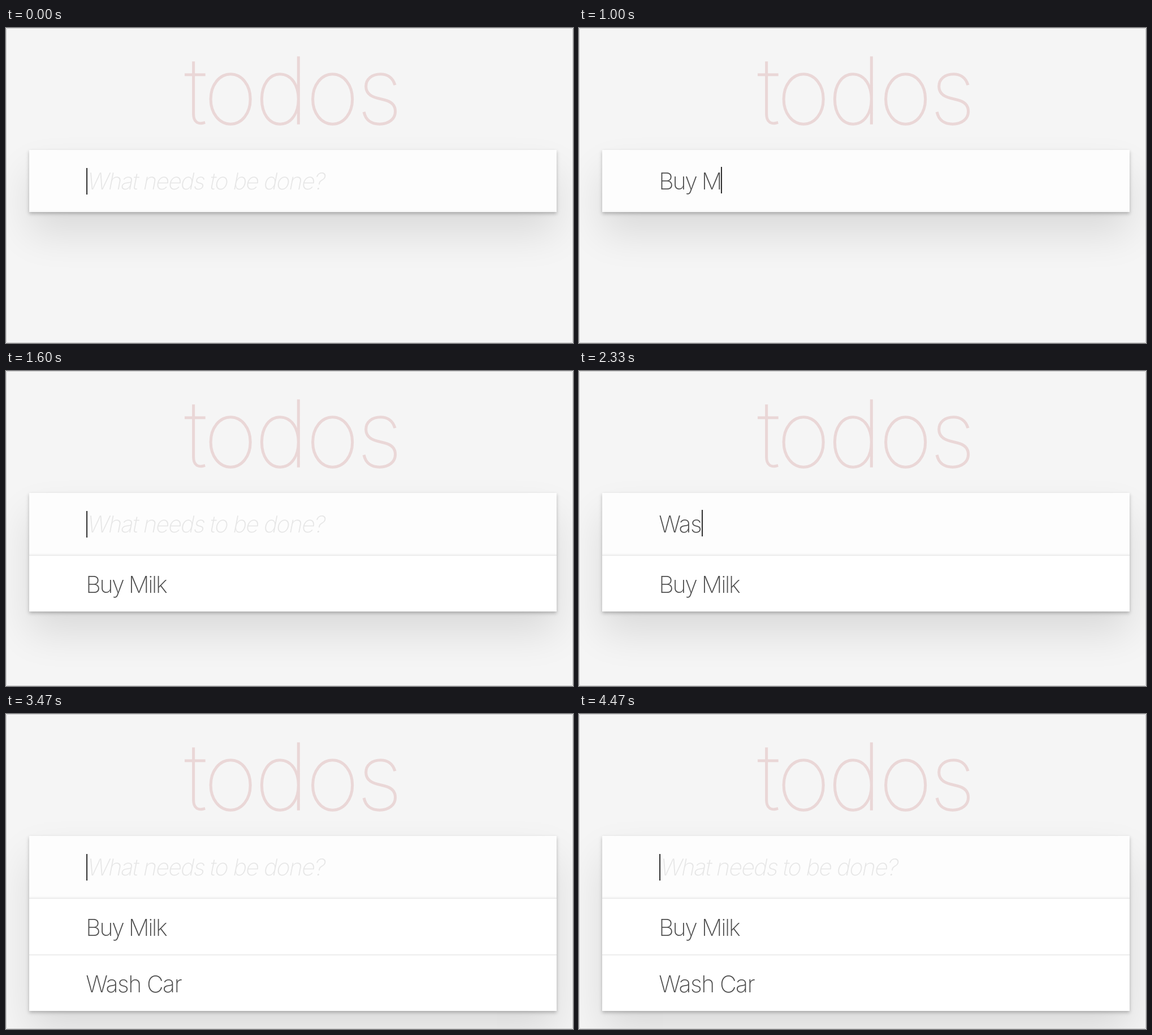
Animation of 1003 by 558 pixels, one loop 4.59 s. Source, as an HTML page:

```html
<!DOCTYPE html>
<html lang="en">
<head>
<meta charset="utf-8">
<title>todos</title>
<style>
  html, body { margin: 0; width: 100%; height: 100%; overflow: hidden; background: #f5f5f5; }
  #stage { position: absolute; left: 0; top: 0; width: 1003px; height: 558px; overflow: hidden; }
  #panel {
    position: absolute; left: 41px; top: 215.5px; width: 933px; background: #fff;
    box-shadow: 0 3.4px 6px rgba(0,0,0,.25), 0 38px 70px rgba(0,0,0,.11);
  }
  #field { height: 110px; background: #fdfdfd; box-shadow: inset 0 -3px 2px rgba(0,0,0,.02); }
  #frame { position: absolute; inset: 0; border: 1px solid #c9c9c9; border-radius: 3px; }
  svg { position: absolute; left: 0; top: 0; }
  text { font-family: Inter, "Helvetica Neue", Arial, sans-serif; white-space: pre; }
  .title {
    font-size: 163px; font-weight: 100; letter-spacing: -4.3px;
    fill: #ead7d7; stroke: #ead7d7; stroke-width: 1.4px;
  }
  .entry { font-size: 41px; font-weight: 200; fill: #4d4d4d; }
  .hint { font-size: 41px; font-weight: 200; fill: #e6e6e6; letter-spacing: -1.7px; }
  .rule { fill: #e4e4e4; }
</style>
</head>
<body>
<div id="stage">
  <div id="panel"><div id="field"></div></div>
  <svg width="1003" height="558" viewBox="0 0 1003 558">
    <text class="title" x="316" y="169.5">todos</text>
    <text class="hint" id="hint" transform="translate(142 286) skewX(-11)">What needs to be done?</text>
    <text class="entry" id="draft" x="141.3" y="286"></text>
    <g id="items"></g>
    <rect id="caret" width="1.8" height="47" fill="#181818"/>
  </svg>
  <div id="frame"></div>
</div>
<script>
const LOOP = 4590;
const FIELD_HEIGHT = 110, ROW_HEIGHT = 100.2;
const CARET_OFF = [4000, 4470];

// Each task: its text and tracking, the time of every keystroke, the time it is added,
// and the caret's place after each key.
const TASKS = [
  { text: "Buy Milk", tracking: -2.3, added: 1600,
    keys: [130, 400, 600, 800, 930, 1070, 1270, 1470],
    carets: [169, 191, 208, 218, 252, 260, 268, 284.4] },
  { text: "Wash Car", tracking: -1.5, added: 3470,
    keys: [2000, 2200, 2330, 2530, 2600, 2870, 3070, 3200],
    carets: [179, 199, 218, 238, 249, 279, 299, 311.4] }
];

const byId = id => document.getElementById(id);
const panel = byId("panel"), hint = byId("hint"), draft = byId("draft"), caret = byId("caret");

function make(parent, tag, attributes) {
  const node = document.createElementNS("http://www.w3.org/2000/svg", tag);
  for (const [name, value] of Object.entries(attributes)) node.setAttribute(name, value);
  return parent.appendChild(node);
}

function write(node, text, tracking) {
  node.textContent = text;
  node.style.letterSpacing = tracking + "px";
}

const rows = TASKS.map((task, i) => {
  const row = make(byId("items"), "g", {});
  make(row, "rect", { class: "rule", x: 41, y: 325.8 + i * 100.2, width: 933, height: 1.3 });
  write(make(row, "text", { class: "entry", x: 141.3, y: 393 + i * 100 }), task.text, task.tracking);
  return row;
});

const show = (node, visible) => node.setAttribute("visibility", visible ? "visible" : "hidden");

function render(time) {
  const done = TASKS.filter(task => time >= task.added).length;
  const task = TASKS[done];
  const typed = task ? task.keys.filter(key => time >= key).length : 0;

  panel.style.height = FIELD_HEIGHT + done * ROW_HEIGHT + "px";
  rows.forEach((row, i) => show(row, i < done));
  show(hint, !typed);
  if (typed) write(draft, task.text.slice(0, typed), task.tracking);
  show(draft, typed);

  caret.setAttribute("x", typed ? task.carets[typed - 1] - 0.9 : 142.2);
  caret.setAttribute("y", typed ? 246 : 248);
  show(caret, time < CARET_OFF[0] || time >= CARET_OFF[1]);
}

const start = performance.now();
function tick() {
  render((performance.now() - start) % LOOP);
  requestAnimationFrame(tick);
}
tick();
</script>
</body>
</html>
```
